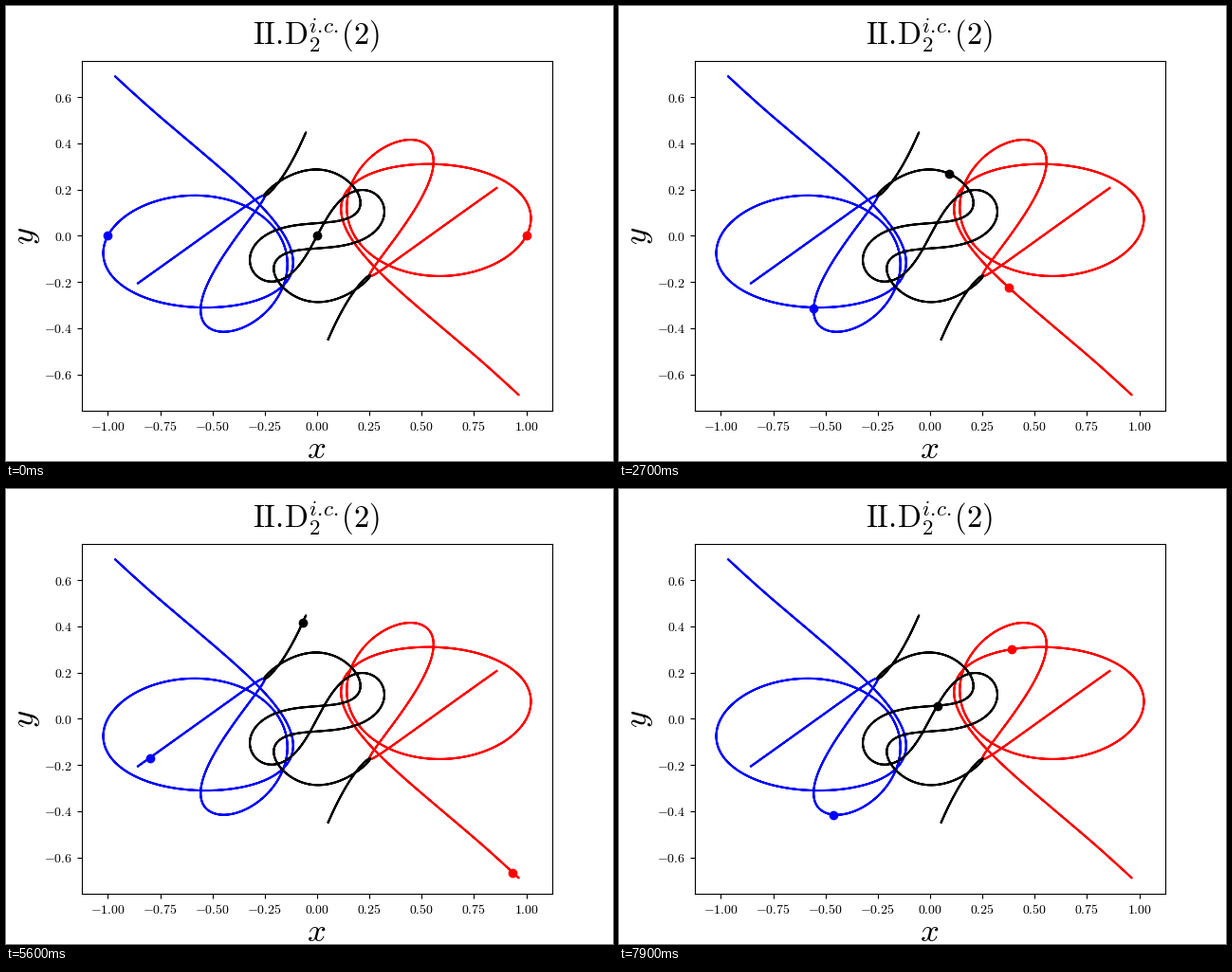
These frames come from a looping animation (640 by 480 pixels, 8000 ms). A matplotlib script:

```python
import numpy as np
import matplotlib.pyplot as plt
from matplotlib.animation import FuncAnimation

plt.rcParams["mathtext.fontset"] = "cm"

WIDTH, HEIGHT, DPI = 640, 480, 100
FRAMES, INTERVAL = 80, 100
TIME_STEP = 0.044
MASSES = np.array([1.0, 1.0, 2.0])
COLORS = ["blue", "red", "black"]


def derivative(state):
    """Planar Newtonian gravity; positions and velocities are complex."""
    pos = state[:3]
    gap = pos[None, :] - pos[:, None]
    dist = np.abs(gap) + np.eye(3)
    return np.concatenate([state[3:], (MASSES * gap / dist**3).sum(axis=1)])


def integrate(vx, vy, end):
    """RK4 whose step shrinks when two bodies come close."""
    v = vx + 1j * vy
    state = np.array([-1, 1, 0, v, v, -2 * v / MASSES[2]], dtype=complex)
    t, times, states = 0.0, [0.0], [state]
    while t < end - 1e-12:
        a, b, c = state[:3]
        nearest = min(abs(a - b), abs(b - c), abs(a - c))
        h = min(0.01 * max(nearest, 0.005) ** 1.5, end - t)
        k1 = derivative(state)
        k2 = derivative(state + h / 2 * k1)
        k3 = derivative(state + h / 2 * k2)
        k4 = derivative(state + h * k3)
        state = state + h / 6 * (k1 + 2 * k2 + 2 * k3 + k4)
        t += h
        times.append(t)
        states.append(state)
    return np.array(times), np.array(states)


def rest_error(params):
    speed = integrate(*params)[1][-1, 3:]
    return np.concatenate([speed.real, speed.imag])


def polish(params, rounds=3, eps=1e-6):
    """Gauss-Newton towards all bodies being at rest after a quarter period."""
    error = rest_error(params)
    for _ in range(rounds):
        slopes = [(rest_error(params + d) - error) / eps for d in eps * np.eye(3)]
        step = np.linalg.lstsq(np.array(slopes).T, error, rcond=None)[0]
        trial = params - step
        if np.abs(step).max() > 0.02:
            break
        trial_error = rest_error(trial)
        if np.linalg.norm(trial_error) >= np.linalg.norm(error):
            break
        params, error = trial, trial_error
    return params


orbit = polish(np.array([0.3057224330, 0.5215124257, 8.8237067653 / 4]))
quarter = orbit[2]
times, states = integrate(*orbit)
paths = states[:, :3].T


def positions(t):
    """The motion retraces itself after the moment of rest."""
    t = min(t, 2 * quarter - t)
    return [np.interp(t, times, p.real) + 1j * np.interp(t, times, p.imag)
            for p in paths]


fig, ax = plt.subplots(figsize=(WIDTH / DPI, HEIGHT / DPI), dpi=DPI)

# Before t = 0 each body follows the point reflection of its partner.
for body, partner, color in zip(range(3), (1, 0, 2), COLORS):
    arc = np.concatenate([-paths[partner][::-1], paths[body][1:]])
    loop = np.concatenate([arc, arc[::-1]])
    ax.plot(loop.real, loop.imag, color=color, lw=1.5)

dots = [ax.plot([p.real], [p.imag], "o", color=color)[0]
        for p, color in zip(positions(0), COLORS)]

ax.set_xticks(np.arange(-4, 5) / 4)
ax.set_yticks(np.arange(-3, 4) / 5)
ax.xaxis.set_major_formatter(lambda v, _: f"${v:.2f}$")
ax.yaxis.set_major_formatter(lambda v, _: f"${v:.1f}$")


def label(x, y, text, size=25, rotation=0):
    fig.text(x / WIDTH, 1 - y / HEIGHT, text, size=size, rotation=rotation,
             ha="center", va="baseline", rotation_mode="anchor")


label(327, 41, r"$\mathrm{II.\!D}_2^{i.\!c.\!}(2)$", size=23.5)
label(327.5, 477, "$x$")
label(29, 242.5, "$y$", rotation=90)


def update(frame):
    for dot, p in zip(dots, positions(frame * TIME_STEP)):
        dot.set_data([p.real], [p.imag])
    return dots


anim = FuncAnimation(fig, update, frames=FRAMES, interval=INTERVAL,
                     repeat=True, repeat_delay=0)
plt.show()
```
